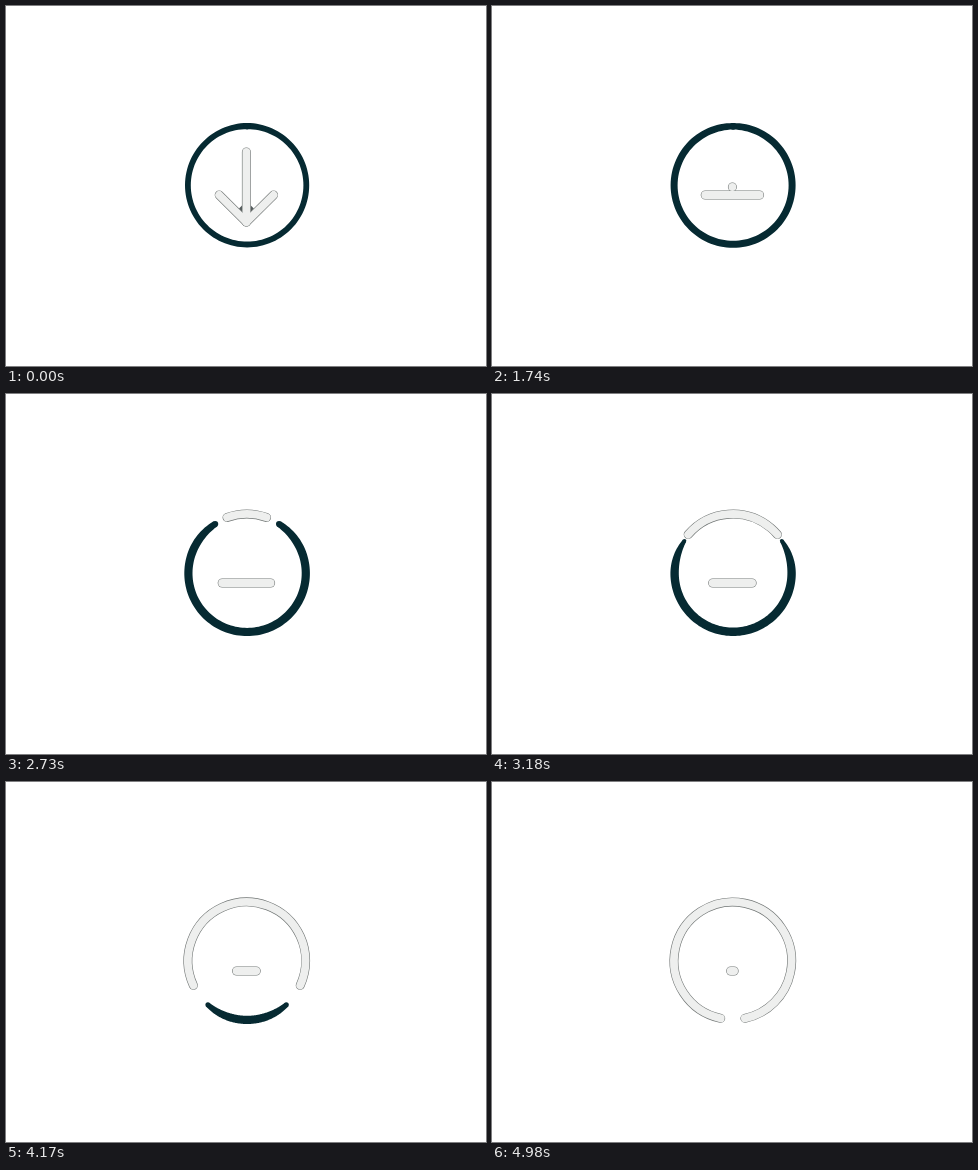
An HTML page with a canvas for the animation above (5.01 s loop, 480 px wide and 360 px high).

```html
<!DOCTYPE html>
<html lang="en">
<head>
<meta charset="utf-8">
<title>Download</title>
<style>
html, body { margin: 0; width: 100%; height: 100%; overflow: hidden; background: #fff; }
canvas { display: block; }
</style>
</head>
<body>
<canvas id="stage" width="480" height="360"></canvas>
<script>
const ctx = document.getElementById('stage').getContext('2d');
const LOOP = 5010, STEP = 30;
const PULL = 1230, THROW = 1745, LAND = 2433, GONE = 4560;
const DARK = '#062a32', PALE = '#eeefee', EDGE = '#717675';
const CX = 240.8, CY = 178.8, R = 58.8;
const RING_X = 241.1, RING_Y = 179.3;
const RAD = Math.PI / 180;

// [time, half gap in degrees, width at the tips, width at the bottom, radius]
const RING = [
  [1230, 0, 6.4, 5.8, 59.2],
  [1740, 0, 6.4, 7, 59],
  [1900, 0, 5, 7.8, 58.8],
  [2070, 18, 4.6, 8.2, 58.7],
  [2730, 33, 6.2, 8.2, 58.7],
  [3600, 78, 1.6, 8.6, 58.3],
  [4170, 138, 5, 8.2, 58.6],
  [GONE, 178, 3, 4, 58.6]
];

const clamp = x => Math.min(1, Math.max(0, x));
const span = (t, a, b) => clamp((t - a) / (b - a));
const mix = (a, b, k) => a + (b - a) * k;
const smooth = k => k * k * (3 - 2 * k);
const easeOut = k => k * (2 - k);

function sample(table, t) {
  let i = 0;
  while (i < table.length - 2 && t > table[i + 1][0]) i++;
  const a = table[i], b = table[i + 1], k = span(t, a[0], b[0]);
  return a.slice(1).map((v, n) => mix(v, b[n + 1], k));
}

// Angles run clockwise from the top
function polar(r, deg) {
  return [RING_X + r * Math.sin(deg * RAD), RING_Y - r * Math.cos(deg * RAD)];
}

function polyline(...pts) {
  const p = new Path2D();
  pts.forEach(([x, y]) => p.lineTo(x, y));
  return p;
}

function drawRing(t) {
  if (t >= GONE) return;
  const [gap, tip, base, radius] = sample(RING, t);
  const taper = Math.min(36, 181 - gap);
  const n = 120, outer = [], inner = [];
  for (let i = 0; i <= n; i++) {
    const a = mix(gap, 360 - gap, i / n);
    const w = mix(tip, base, easeOut(clamp((Math.min(a, 360 - a) - gap) / taper)));
    outer.push(polar(radius + w / 2, a));
    inner.unshift(polar(radius - w / 2, a));
  }
  ctx.fillStyle = DARK;
  ctx.fill(polyline(...outer, ...inner));
  for (const a of [gap, 360 - gap]) {
    ctx.beginPath();
    ctx.arc(...polar(radius, a), tip / 2, 0, 2 * Math.PI);
    ctx.fill();
  }
}

function outlined(paths, width = 9) {
  for (const [color, w] of [[EDGE, width], [PALE, width - 1.2]]) {
    ctx.strokeStyle = color;
    ctx.lineWidth = w;
    paths.forEach(p => ctx.stroke(p));
  }
}

function drawArrow(t) {
  const k = smooth(span(t, PULL, THROW));
  const bend = mix(216, 189, k);
  const half = 27.2 - 0.01 * Math.max(0, t - LAND);
  const line = polyline([240.4 - half, 189], [240.4, bend], [240.4 + half, 189]);
  if (t >= THROW) {
    outlined([line]);
    return;
  }
  // Shade where the stem meets the head
  ctx.globalAlpha = 1 - span(t, PULL, PULL + 150);
  ctx.fillStyle = '#555c5d';
  ctx.fill(polyline([233, 202.5], [236, 199.5], [244.8, 199.5], [247.8, 202.5], [240.4, 212]));
  ctx.globalAlpha = 1;
  outlined([polyline([240.4, mix(146, 181, k)], [240.4, mix(216, 181.01, k)]), line]);
}

function drawDot(t) {
  if (t < THROW) return;
  if (t < LAND) {
    const y = 109 + 10 * ((t - 2250) / 180) ** 2;
    outlined([polyline([240.4, y], [240.4, y + 0.01])], 9.8);
    return;
  }
  const a = (0.05 + (t - LAND) * 0.066) * RAD;
  const arc = new Path2D();
  arc.arc(CX, CY, R, -Math.PI / 2 - a, -Math.PI / 2 + a);
  outlined([arc]);
}

function draw(t) {
  ctx.fillStyle = '#fff';
  ctx.fillRect(0, 0, 480, 360);
  ctx.lineCap = ctx.lineJoin = 'round';
  drawRing(t);
  drawArrow(t);
  drawDot(t);
}

const start = performance.now();
function tick() {
  const t = (performance.now() - start) % LOOP;
  draw(Math.floor(t / STEP) * STEP);
  requestAnimationFrame(tick);
}
tick();
</script>
</body>
</html>
```
